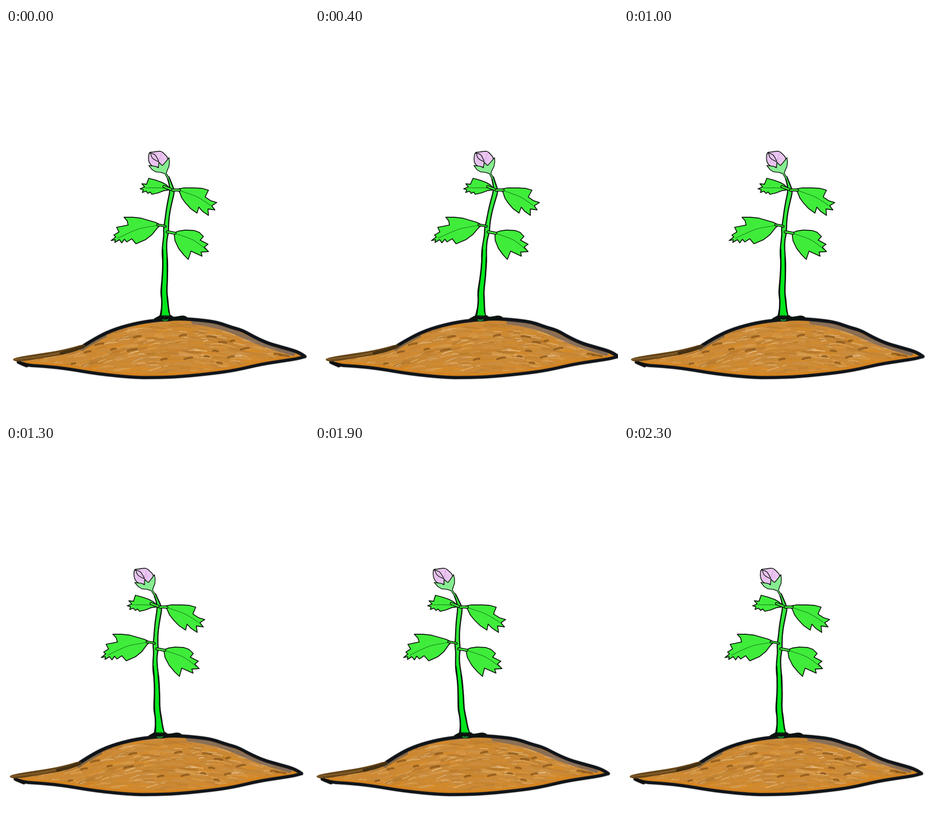
These frames come from a looping animation (660x849 px, 2400 ms). An HTML page with a canvas:

```html
<!DOCTYPE html>
<html lang="en">
<head>
<meta charset="utf-8">
<title>Swaying seedling</title>
<style>
html, body { margin: 0; width: 100%; height: 100%; overflow: hidden; background: #fff; }
canvas { display: block; }
</style>
</head>
<body>
<canvas id="stage" width="660" height="849"></canvas>
<script>
const W = 660, H = 849, PAD = 40, SCALE = 2;
const stage = document.getElementById('stage').getContext('2d');
const art = document.createElement('canvas');
art.width = (W + PAD * 2) * SCALE;
art.height = H * SCALE;
const c = art.getContext('2d');
c.scale(SCALE, SCALE);
c.translate(PAD, 0);
c.lineCap = c.lineJoin = 'round';

let seed = 11;
function rand(a = 0, b = 1) {
  seed = (seed * 16807) % 2147483647;
  return a + (b - a) * seed / 2147483647;
}
const pick = list => list[Math.floor(rand(0, list.length))];

// Shapes are written as "x,y x,y ..."
const points = text => text.split(' ').map(p => p.split(',').map(Number));

function poly(text, closed) {
  const path = new Path2D();
  points(text).forEach(([x, y], i) => i ? path.lineTo(x, y) : path.moveTo(x, y));
  if (closed) path.closePath();
  return path;
}

function smooth(text, closed) {
  const pts = points(text), path = new Path2D(), n = pts.length;
  const mid = (a, b) => [(a[0] + b[0]) / 2, (a[1] + b[1]) / 2];
  if (closed) {
    path.moveTo(...mid(pts[n - 1], pts[0]));
    pts.forEach((p, i) => path.quadraticCurveTo(...p, ...mid(p, pts[(i + 1) % n])));
    path.closePath();
  } else {
    path.moveTo(...pts[0]);
    for (let i = 1; i < n - 1; i++)
      path.quadraticCurveTo(...pts[i], ...(i === n - 2 ? pts[n - 1] : mid(pts[i], pts[i + 1])));
  }
  return path;
}

function line(path, color, width) {
  c.strokeStyle = color;
  c.lineWidth = width;
  c.stroke(path);
}

function fill(path, color) {
  c.fillStyle = color;
  c.fill(path);
}

function streak(x, y, len, angle, color, width) {
  const dx = Math.cos(angle) * len / 2, dy = Math.sin(angle) * len / 2;
  const path = new Path2D();
  path.moveTo(x - dx, y - dy);
  path.quadraticCurveTo(x, y - 1.5, x + dx, y + dy);
  line(path, color, width);
}

const TOP = '170,693 200,674 240,656 290,643 335,637 380,634 430,638 462,643 490,653 515,660 540,674 570,688 602,697 640,708 651,717';
const BOTTOM = '651,717 640,721 600,727 555,734 500,747 450,754 380,761 330,763 280,763 200,755 130,743 80,738 42,736 27,729';

function drawMound() {
  const body = smooth(TOP + ' ' + BOTTOM + ' 60,722 120,710', true);
  fill(body, '#cb8935');
  c.save();
  c.clip(body);
  const tones = ['#d98a22', '#c6852f', '#b97f39', '#dca050', '#d88c2c', '#b47629', '#ca9148'];
  for (let i = 0; i < 620; i++) {
    const x = rand(20, 650), y = rand(638, 764);
    const slope = Math.max(-.5, Math.min(.4, (x - 350) / 420)) * (1 - (y - 638) / 200);
    c.globalAlpha = rand(.3, .75);
    streak(x, y, rand(15, 48), slope + rand(-.18, .18), pick(tones), rand(2, 6));
  }
  for (let i = 0; i < 110; i++) {
    const x = rand(90, 590), y = rand(655, 752);
    c.globalAlpha = rand(.25, .65);
    streak(x, y, rand(8, 30), (x - 390) / 600 + rand(-.25, .15), pick(['#efd3a4', '#e7bd7e', '#f4e3c6']), rand(.8, 2.2));
  }
  c.globalAlpha = .85;
  line(smooth(BOTTOM), '#d9851e', 18);
  c.globalAlpha = .8;
  const marks = '147,733 178,707 203,690 234,701 286,674 275,703 344,723 397,721 437,717 385,671 448,674 456,705 472,686 493,683 490,718 520,700 465,731 592,712 606,715';
  points(marks).forEach(([x, y], i) =>
    streak(x, y, 8 + i * 5 % 13, x > 400 && x < 475 || x > 560 ? .12 : -.2, '#8b581c', 4.5));
  c.globalAlpha = .65;
  line(smooth('166,700 190,684 215,672'), '#625b55', 9);
  line(smooth('408,642 455,650 490,660 530,678 570,695 625,711'), '#686269', 9);
  c.restore();

  // Soft ink edge, then the brown tail on the left
  c.shadowColor = '#222a';
  c.shadowBlur = 4;
  line(smooth(TOP), '#11151a', 7);
  line(smooth(BOTTOM), '#11151a', 6.5);
  line(smooth('27,729 35,733 45,737'), '#101010', 7);
  c.shadowBlur = 0;
  fill(smooth('13,722 32,717 70,711 110,705 145,697 168,690 176,694 158,704 120,714 75,721 40,727 19,728', true), '#654519');
  line(smooth('18,723 60,719 110,711 165,698'), '#815c29', 3);
  line(smooth('120,710 150,703 169,695'), '#443013', 7);
}

const INK = '#0a140b', LEAF = '#3fec3a';

function drawLeaf(outline, vein) {
  const shape = poly(outline, true);
  fill(shape, LEAF);
  c.save();
  c.clip(shape);
  const pts = points(outline);
  for (let i = 0; i < 18; i++) {
    const [ax, ay] = pick(pts), [bx, by] = pick(pts);
    c.globalAlpha = .35;
    streak((ax + bx) / 2, (ay + by) / 2, rand(5, 15), rand(-1, -.4), pick(['#75f377', '#2fe52d', '#61ef60']), 1);
  }
  c.restore();
  line(shape, INK, 1.9);
  line(smooth(vein), '#127119', 1.1);
}

function drawStem() {
  const left = '335,632 339,612 340,597 337,579 339,556 341,536 342,514 340,493 341,474 344,451 343,438 346,421 349,397 353,375 357,357 356,342 352,329';
  const right = '355,325 359,335 364,347 367,357 363,374 358,396 355,415 354,433 354,446 350,464 350,487 352,508 352,534 351,553 350,574 353,596 354,614 358,632';
  const body = smooth(left + ' ' + right, true);
  const green = c.createLinearGradient(0, 340, 0, 630);
  green.addColorStop(0, '#36e83c');
  green.addColorStop(.4, '#2be834');
  green.addColorStop(.55, '#04ee1e');
  green.addColorStop(1, '#05e51c');
  fill(body, green);
  line(smooth(left), INK, 2.5);
  line(smooth(right), INK, 2.5);
  line(smooth('338,625 340,600 338,578 340,550 342,515 341,483'), INK, 3);
  line(smooth('355,620 352,595 350,574 352,540 351,500'), INK, 3);
  // Stalks between stem and leaves
  [['344,346 351,349 359,352', 5], ['363,354 371,353 378,354', 5],
   ['330,430 338,430 347,433', 4], ['351,445 359,446 368,448', 5]].forEach(([path, width]) => {
    line(smooth(path), INK, width + 1.5);
    line(smooth(path), LEAF, width - 1.8);
  });
}

function drawBase() {
  c.shadowColor = '#1118';
  c.shadowBlur = 3;
  fill(smooth('319,636 332,629 337,626 345,629 354,628 360,626 364,631 376,629 387,627 397,632 389,637 365,638 350,641 333,638', true), '#0c1310');
  c.shadowBlur = 0;
  line(smooth('342,637 347,639 352,637'), '#168b30', 3);
  line(smooth('343,627 347,628 351,627'), '#0a7a20', 2);
}

function drawBud() {
  const petals = smooth('312,271 320,271 330,269 339,269 346,276 352,282 353,291 346,297 337,303 326,304 316,300 311,292 310,282', true);
  fill(petals, '#e9c3f0');
  c.save();
  c.clip(petals);
  for (let i = 0; i < 16; i++)
    streak(rand(315, 350), rand(273, 298), 12, -1, pick(['#f2d8f5', '#e2b4ec']), 1.2);
  c.restore();
  line(petals, INK, 1.7);
  line(smooth('313,273 321,274 328,280 333,292'), INK, 1.5);
  line(smooth('315,272 316,281 323,288 333,292'), INK, 1.5);
  line(smooth('339,270 336,280 333,292'), '#d59ce0', 1);
  const cup = poly('311,300 318,301 326,302 332,305 333,293 338,298 341,300 347,293 355,283 356,292 355,302 351,311 349,317 354,325 351,327 346,318 337,315 326,314 318,309', true);
  fill(cup, '#87ec91');
  line(cup, INK, 1.6);
  line(smooth('347,317 350,322 354,328'), '#58dc65', 2);
}

drawMound();
drawLeaf('357,350 349,342 340,337 326,332 311,328 306,341 296,340 302,347 292,351 299,353 297,359 305,356 309,361 314,358 318,363 331,360 344,355 357,353',
  '356,350 334,348 304,349');
drawLeaf('371,352 387,349 410,349 427,350 441,354 436,364 434,369 446,377 459,381 448,388 455,397 440,395 441,409 428,400 420,391 416,404 402,394 391,382 383,371 378,358',
  '374,353 396,361 420,369 445,387');
drawLeaf('337,430 325,424 311,420 294,415 276,413 257,413 264,421 266,430 241,435 246,445 235,452 239,456 229,464 238,462 237,468 247,462 252,469 258,461 263,467 274,460 283,471 304,462 318,451 330,436',
  '338,430 309,434 281,440 243,459');
drawLeaf('366,447 377,443 391,441 410,442 421,446 430,455 423,463 440,472 432,478 441,488 425,489 427,498 414,492 403,487 397,505 387,495 376,481 368,464',
  '367,448 392,456 414,465 436,484');
drawStem();
drawBase();
drawBud();

// Lean in degrees, one value per 100 ms
const REST = 1.35;
const lean = [REST, 2, 3, 4, 5, 6, 5, 4, 3, 2, REST, 0,
  -1, -1.85, -3, -4, -5, -6, -5, -4, -3, -2, -1, 0];
const slope = deg => Math.tan(deg * Math.PI / 180);

function frame(now) {
  const k = slope(lean[Math.floor(now % 2400 / 100)]) - slope(REST);
  stage.setTransform(1, 0, 0, 1, 0, 0);
  stage.fillStyle = '#fff';
  stage.fillRect(0, 0, W, H);
  // Shear around the bottom edge
  stage.setTransform(1, 0, -k, 1, k * H, 0);
  stage.imageSmoothingQuality = 'high';
  stage.drawImage(art, -PAD, 0, W + PAD * 2, H);
  requestAnimationFrame(frame);
}
frame(performance.now());
</script>
</body>
</html>
```
